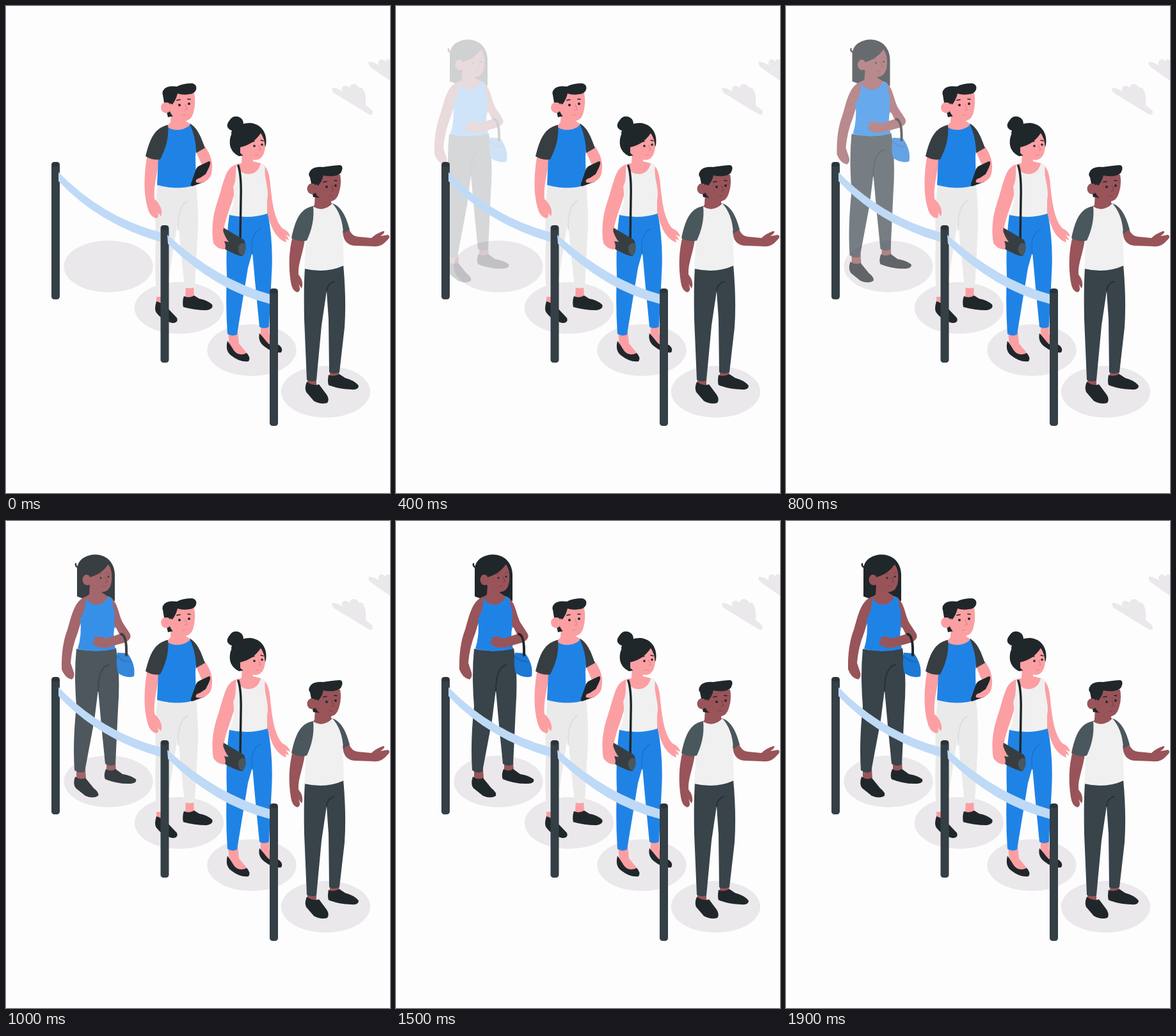
These frames come from a looping animation (600 by 762 pixels, 2 s). An HTML page:

```html
<!DOCTYPE html>
<html lang="en">
<head>
<meta charset="utf-8">
<title>Waiting in line</title>
<style>
  html, body { margin: 0; width: 100%; height: 100%; overflow: hidden; background: #fefdfe; }
  svg { display: block; width: 600px; height: 762px; }
  .ground { fill: #ebe8eb; }
  .ink { fill: #20272b; }
  .sleeve { fill: #373e42; }
  .slate { fill: #4a575d; }
  .trousers { fill: #38434a; }
  .blue { fill: #1f83e6; }
  .white { fill: #f0f0f0; }
  .cream { fill: #ebeaeb; }
  .pink { fill: #fb9fa3; }
  .brown { fill: #985459; }
  .rope { fill: #bfdaf6; }
  .post { fill: #343f46; }
  .line { fill: none; stroke-linecap: round; stroke-linejoin: round; }
</style>
</head>
<body>
<svg viewBox="0 0 600 762">
  <defs>
    <g id="post">
      <rect class="post" width="13" height="215" rx="4.5"/>
      <ellipse cx="6.500" cy="4" rx="6" ry="3.500" fill="#2b343a"/>
    </g>
    <ellipse id="spot" class="ground" rx="69.700" ry="40.500"/>
  </defs>

  <path class="ground" d="M510 128Q508 131 512 136L566 169Q574 173 573 164L562 155C564 140 559 125 552 128C548 120 538 120 537 128C530 121 522 126 526 134Q518 128 510 128Z"/>
  <path class="ground" d="M567 87Q565 91 570 96L600 117V85Q595 80 593 87C588 80 579 84 583 93Q574 87 567 87Z"/>

  <use href="#spot" x="160" y="407.500"/>
  <use href="#spot" x="270.500" y="472.500"/>
  <use href="#spot" x="384" y="538.500"/>
  <use href="#spot" x="499.500" y="603.500"/>

  <g id="newcomer">
    <path class="ink" d="M121 76C121 60 136 52.500 150 52.500C169 53 180 67 180 85V125Q150 130 121 118Z"/>
    <path class="line" stroke="#20272b" stroke-width="2.500" d="M123 73Q118 71 119 67"/>
    <path class="brown" d="M120 386H134L135 405Q128 410 120 403ZM167 376H181L182 392Q174 398 167 390Z"/>
    <path class="ink" d="M118 400Q114 412 119 418L134 430Q146 435 154 430Q156 425 147 418L134 402Q126 406 118 400Z"/>
    <path class="ink" d="M166 388Q162 398 165 404Q185 412 205 411Q215 410 213 404Q205 398 192 396L181 388Q173 393 166 388Z"/>
    <path class="trousers" d="M120 200Q150 207 182 199Q189 240 185 295L181 381Q173 385 165 380L159 320L154 264L148 312L133 392Q125 396 117 390Q114 345 120 290Q116 240 120 200Z"/>
    <path class="line" stroke="#283137" stroke-width="2" d="M154 266Q154 228 171 225"/>
    <path class="brown" d="M141 100L140 115L136 118L133 150H176L177 123L169 118L160 112V100Z"/>
    <path class="brown" d="M139 117C117 121 113 147 106 170Q96 196 97 232Q102 246 113 248Q119 243 115 234L111 222Q113 197 122 175L129 152Z"/>
    <path class="brown" d="M168 117C186 123 184 145 194 162L180 167Z"/>
    <path class="blue" d="M135 119C139 134 163 136 169 118L175 120C177 138 184 150 180 164Q176 181 181 200Q150 207 122 200Q129 178 126 153Q135 140 135 119Z"/>
    <path class="brown" d="M180 145Q190 154 204 177Q207 185 196 190L168 198Q152 200 145 191Q143 187 151 187L146 183Q155 178 166 184L187 177L179 161Z"/>
    <path fill="#1c79d5" d="M184 206Q181 224 185 238Q199 247 210 243Q213 225 200 207Z"/>
    <path class="line" stroke="#1565b8" stroke-width="1.500" d="M184 211Q190 220 204 220"/>
    <path class="line" stroke="#20272b" stroke-width="4" d="M190 177Q199 179 198 210"/>
    <path class="brown" d="M139 88Q152 80 168 66Q177 75 175 94Q173 110 161 111Q146 109 139 99Z"/>
    <ellipse class="brown" cx="136.500" cy="92" rx="7" ry="8.500"/>
    <path class="ink" d="M131 84Q128 62 152 57Q168 58 171 66Q160 83 141 88Q140 83 131 84Z"/>
    <g class="ink"><circle cx="158" cy="89" r="1.500"/><circle cx="170" cy="87" r="1.500"/></g>
    <path class="line" stroke="#7d4048" stroke-width="1.200" d="M165 88L169 95L165 96M159 102L165 102M154 83L159 82M168 81L172 81"/>
  </g>

  <g id="tablet-man">
    <path class="pink" d="M235 450H246L247 468H235ZM281 435H293L294 458Q286 462 280 457Z"/>
    <path class="ink" d="M235 462Q231 475 235 480Q244 492 260 496Q270 496 267 488L252 472Q243 464 235 462Z"/>
    <path class="ink" d="M278 454Q275 462 277 471Q295 476 313 476Q325 474 322 467Q314 460 302 458L294 453Q286 458 278 454Z"/>
    <path class="cream" d="M237 278H297Q302 330 299 365L295 440Q287 443 279 440L272 372L269 335L263 370L250 455H235Q232 410 234 370Q232 318 237 278Z"/>
    <path class="line" stroke="#dedddf" stroke-width="2" d="M269 350Q268 312 284 305"/>
    <path class="pink" d="M221 232L239 238C237 262 230 282 232 302C240 309 246 320 242 329L237 323Q240 332 234 332Q224 329 221 315C214 290 216 258 221 232Z"/>
    <path class="pink" d="M297 228L311 220C321 234 324 248 321 260C318 273 306 278 297 276L307 251Z"/>
    <path class="pink" d="M258 165L257 182L249 190Q270 212 291 187L281 180V165Z"/>
    <path class="blue" d="M250 187C258 197 281 196 289 184L298 215L296 235L297 280Q267 289 236 280L239 215Z"/>
    <path class="sleeve" d="M253 186C232 191 225 207 218 235Q228 242 241 240C250 222 255 205 253 186Z"/>
    <path class="sleeve" d="M287 184C300 190 306 209 311 222L297 230C297 212 293 198 287 184Z"/>
    <path class="ink" d="M302 250L317 243Q320 243 319 247L312 272Q311 275 308 276L291 282Q288 282 289 278L297 255Q298 252 302 250Z"/>
    <path class="pink" d="M319 249Q325 262 316 271Q307 279 297 276Q295 271 303 269L312 263Z"/>
    <path class="ink" d="M251 165L253 174L263 172V150L250 145Z"/>
    <path class="pink" d="M257 142Q275 131 294 136Q297 151 293 166Q290 180 277 180Q262 179 256 165Z"/>
    <ellipse class="pink" cx="250" cy="159" rx="8" ry="8.500"/>
    <path class="ink" d="M247 151L245 139Q243 134 248 129Q254 124 267 126Q276 121 291 121Q299 123 297 131Q294 138 286 138Q277 140 268 137Q266 146 260 154L254 151Z"/>
    <g class="ink"><circle cx="271" cy="155" r="2"/><circle cx="286" cy="153" r="2"/></g>
    <path class="line" stroke="#20272b" stroke-width="1.700" d="M267 147.500L272 146.500M284 145.500L288 146"/>
    <path class="line" stroke="#e4808a" stroke-width="1.200" d="M280 154L283 162L279 163M276 171L280 170.500"/>
  </g>

  <g id="bag-woman">
    <path class="pink" d="M347 508H362L364 528L378 545Q360 552 349 532ZM398 498H411V514L425 532Q408 532 398 516Z"/>
    <path class="ink" d="M346 524Q342 540 352 547Q366 558 379 556Q383 550 376 543Q364 549 356 539Q350 529 346 524Z"/>
    <path class="ink" d="M396 512Q393 525 404 533Q418 544 430 542Q434 536 426 530Q414 534 407 525Q400 516 396 512Z"/>
    <path class="blue" d="M349 326Q380 333 409 324Q418 370 415 420L411 502Q403 506 396 502L389 430L385 385L378 410L361 514Q354 518 346 513Q343 470 345 420Q343 370 349 326Z"/>
    <path class="line" stroke="#1773d2" stroke-width="1.600" d="M385 388Q380 358 398 349"/>
    <path class="pink" d="M369 228L368 246Q352 247 345 261C338 277 336 290 330 307C322 332 321 352 324 371Q332 382 342 380L340 350C345 325 355 305 359 285L403 290C405 315 411 340 420 355Q428 367 438 370L437 364L442 367Q441 361 436 358L444 361Q442 352 432 348C420 335 416 310 413 280Q411 250 398 246L386 243L385 228Z"/>
    <path class="white" d="M360 247C364 267 393 270 398 246L405 249C402 272 412 282 408 304L408 325Q380 334 349 327C357 310 357 295 355 283C361 270 358 257 360 247Z"/>
    <path class="line" stroke="#20272b" stroke-width="3.500" d="M363 250Q368 265 367 300L366 365"/>
    <path class="sleeve" d="M340 347L372 366Q378 379 370 391Q366 393 343 381L336 370Z"/>
    <path class="slate" d="M363 377Q368 367 374 373Q376 384 370 391Q362 389 363 377Z"/>
    <path class="pink" d="M325 348H338Q342 362 348 369L341 368Q345 377 341 381Q329 380 324 370Z"/>
    <path class="ink" d="M350 178C355 169 371 172 371 184Q371 192 366 195L356 203Q350 201 353 195Q340 190 350 178Z"/>
    <path class="ink" d="M350 218C347 196 364 183 381 183C398 184 409 198 406 218L400 230L364 235Q352 229 350 218Z"/>
    <path class="pink" d="M366 221Q386 217 398 199Q404 207 405 221Q403 240 390 241Q375 240 366 230Z"/>
    <g class="ink"><circle cx="388" cy="219" r="1.800"/><circle cx="400" cy="217" r="1.800"/></g>
    <path class="line" stroke="#20272b" stroke-width="1.400" d="M384 212.500L388 211.500M398 210L402 211"/>
    <path class="line" stroke="#e4808a" stroke-width="1.200" d="M395 218L398 225L395 226M390 233.500L395 233"/>
  </g>

  <g id="front-man">
    <path class="brown" d="M471 580H485V597H471ZM506 568H520L521 584H506Z"/>
    <path class="ink" d="M470 588Q466 597 469 604L481 618Q492 624 502 621Q506 616 501 608L489 592Q480 595 470 588Z"/>
    <path class="ink" d="M504 577Q502 588 504 593Q520 600 540 600Q551 601 551 594Q545 586 530 582L521 576Q510 581 504 577Z"/>
    <path class="trousers" d="M467 410Q500 418 527 404Q532 460 529 503L521 573Q513 577 505 573L504 490L501 446L493 500L485 586Q477 589 470 585L466 490Q465 440 467 410Z"/>
    <path class="line" stroke="#283137" stroke-width="2" d="M501 446Q502 434 513 431"/>
    <path class="brown" d="M448 360L467 364C465 385 456 402 457 420Q466 431 462 442L457 435Q462 446 455 448Q447 446 445 432C441 408 442 383 448 360Z"/>
    <path class="brown" d="M526 352L536 349Q540 360 550 361L571 363Q578 356 590 352Q594 354 585 360L597 358Q602 361 595 367Q586 378 573 376L545 375Q527 374 526 352Z"/>
    <path class="brown" d="M483 293L482 311L477 317Q496 332 512 311L508 308V295Z"/>
    <path class="white" d="M479 313Q495 324 510 309Q523 320 526 350L528 406Q500 419 466 411L470 350Z"/>
    <path class="slate" d="M480 313C459 317 452 335 446 363Q457 370 470 367C478 350 482 332 480 313Z"/>
    <path class="slate" d="M510 309C526 314 533 335 537 350L527 356C526 335 520 320 510 309Z"/>
    <path class="ink" d="M478 290L480 299L490 300V275H478Z"/>
    <path class="brown" d="M485 270Q502 259 522 264Q525 278 520 293Q516 306 505 306Q489 304 483 292Z"/>
    <ellipse class="brown" cx="478" cy="286" rx="7.500" ry="8.500"/>
    <path class="ink" d="M477 278L475 268Q471 264 476 257Q482 251 495 252Q508 250 521 249Q527 249 525 257Q523 265 512 266Q503 267 496 265Q494 274 488 281L483 278Z"/>
    <g class="ink"><circle cx="501" cy="283" r="1.900"/><circle cx="515" cy="281" r="1.900"/></g>
    <path class="line" stroke="#20272b" stroke-width="1.700" d="M496 275.500L501 274.500M513 273L517 273.500"/>
    <path class="line" stroke="#7d4048" stroke-width="1.200" d="M509 281L512 289L508 290M505 297.500L510 297"/>
  </g>

  <use href="#post" x="71" y="244"/>
  <use href="#post" x="241.500" y="343"/>
  <use href="#post" x="412" y="442"/>
  <path class="rope" d="M82 260Q150 330 241 354V369Q145 341 82 274Z"/>
  <path class="rope" d="M252 358Q330 428 412 451V466Q325 444 253 372Z"/>
</svg>
<script>
  const LOOP = 2000, STEP = 100;
  const newcomer = document.getElementById("newcomer");

  // [time in ms, value]
  const slide = [[0, -43], [400, -37], [600, -28], [800, -17.5], [1000, -10], [1300, 0], [1500, 2], [1700, 2], [1900, 0]];
  const fade = [[0, 0], [100, .02], [400, .2], [800, .68], [1000, .89], [1200, 1]];

  function valueAt(keys, time) {
    const next = keys.findIndex(([keyTime]) => keyTime > time);
    if (next < 0) return keys[keys.length - 1][1];
    const [t0, v0] = keys[next - 1], [t1, v1] = keys[next];
    return v0 + (v1 - v0) * (time - t0) / (t1 - t0);
  }

  const start = performance.now();
  function draw() {
    const elapsed = Math.max(0, performance.now() - start) % LOOP;
    const time = Math.floor(elapsed / STEP) * STEP;
    newcomer.setAttribute("transform", `translate(${valueAt(slide, time)} 0)`);
    newcomer.setAttribute("opacity", valueAt(fade, time));
    requestAnimationFrame(draw);
  }
  draw();
</script>
</body>
</html>
```
